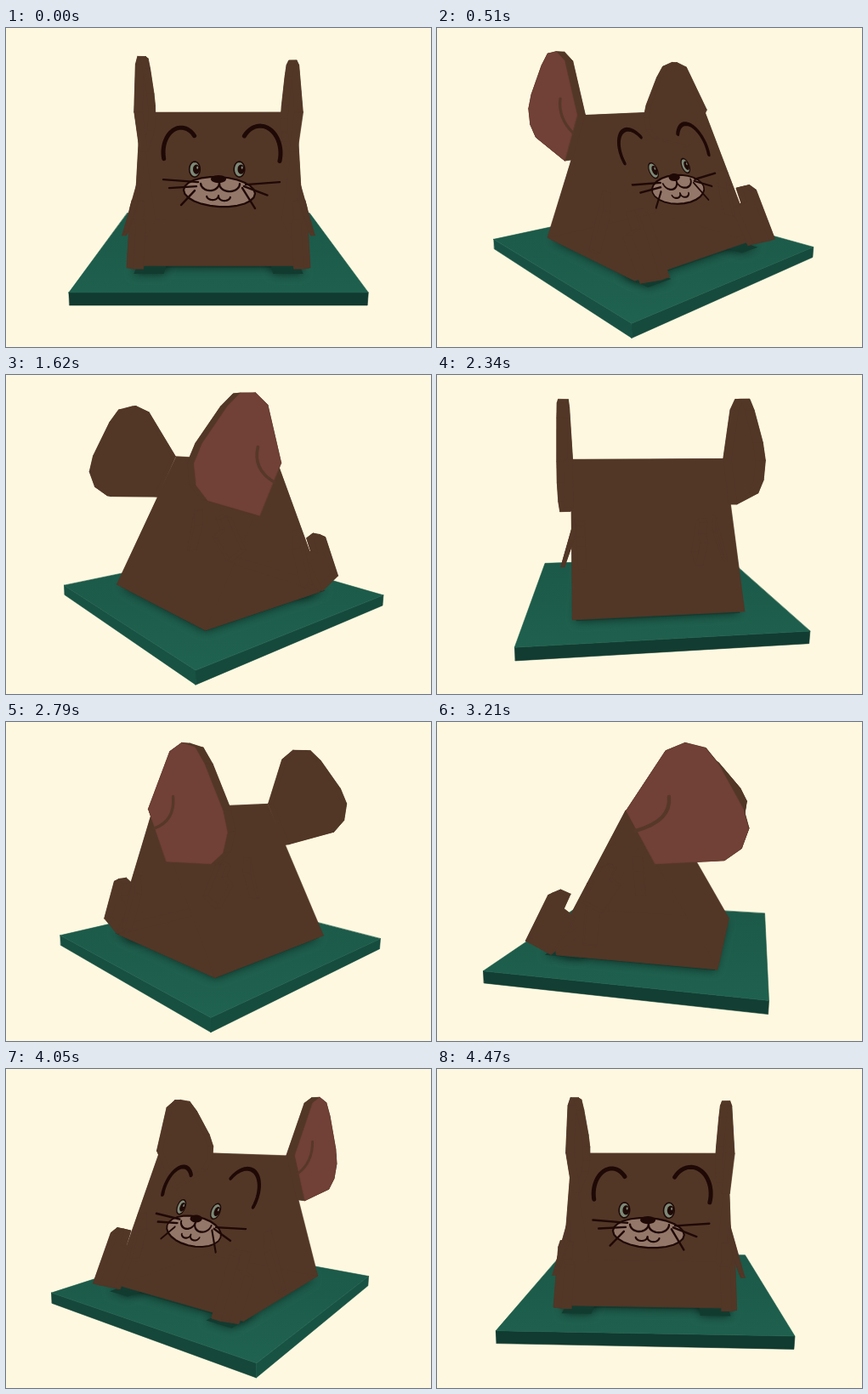
An HTML page with a canvas for the animation above (4500 ms loop, 500x375 px).

```html
<!DOCTYPE html>
<html lang="en">
<head>
<meta charset="utf-8">
<title>Turntable</title>
<style>
html, body { margin: 0; width: 100%; height: 100%; overflow: hidden; background: #fff8e0; }
canvas { display: block; width: 500px; height: 375px; }
</style>
</head>
<body>
<canvas id="stage" width="500" height="375"></canvas>
<script>
const ctx = document.getElementById('stage').getContext('2d');
const STEP = 30, STEPS = 150, CAM = 4.1, RAD = Math.PI / 180;
const BROWN = '#523727', PINK = '#714037', INK = '#1f0906', CURL = '#563829', EYE = '#7d8a78';
let sin = 0, cos = 1;

const range = n => [...Array(n).keys()];

// Model space: x right, y up from the slab, z towards the face.
function project([x, y, z]) {
  const vx = cos * x + sin * z, vz = cos * z - sin * x;
  const k = 1 / (0.0075 - 0.00183 * vz - 0.000393 * y);
  return [250 + k * vx, 187.5 + k * (0.484 + 0.21 * vz - 0.978 * y)];
}

function trace(points) {
  ctx.beginPath();
  points.forEach(p => ctx.lineTo(...project(p)));
  ctx.closePath();
}

function fill(points, color) {
  trace(points);
  ctx.fillStyle = ctx.strokeStyle = color;
  ctx.lineWidth = 0.6;
  ctx.fill();
  ctx.stroke();
}

// Solid between two matching outlines; one flat colour needs no sorting.
function solid(a, b) {
  fill(a, BROWN);
  fill(b, BROWN);
  a.forEach((p, i) => {
    const j = (i + 1) % a.length;
    fill([p, a[j], b[j], b[i]], BROWN);
  });
}

const atX = (profile, x) => profile.map(([z, y]) => [x, y, z]);
const atZ = (profile, side, z) => profile.map(([x, y]) => [side * x, y, z]);

const BODY = [[0.02, 1.132], [0.6, 0.1], [0.59, 0.02], [-0.65, 0.02]];
const PAW = [[0.64, 0.015], [0.85, 0.11], [0.64, 0.49], [0.57, 0.52], [0.49, 0.49], [0.55, 0.37], [0.45, 0.3]];
const FLAP = [[0.64, 0.6], [0.775, 0.17], [0.745, 0.17], [0.64, 0.45]];

// An ear is two rounded corners swung around a hinge on the back slope.
const EARS = [{ side: 1, tilt: 11, reach: 0.505 }, { side: -1, tilt: 0, reach: 0.48 }];
const EAR_IN = 0.63, EAR_OUT = 0.7, CORNER = 0.225;

const polar = ([u, y], r, deg) => [u + r * Math.cos(deg * RAD), y + r * Math.sin(deg * RAD)];
const hinge = [0.1, 0.95];

for (const ear of EARS) {
  const { tilt, reach } = ear;
  const corner = (at, from) => range(4).map(i =>
    polar(polar(hinge, reach, at - tilt), CORNER, from - 35 * i - tilt));
  ear.rim = [[0, 1.135], ...corner(63, 139), ...corner(20, 46), [0.205, 0.775]];
  ear.curl = [polar(hinge, 0.68 * reach, 66 - tilt), polar(hinge, 0.49 * reach, 40 - tilt), [0.065, 1]];
}
const earAt = (points, x) => points.map(([u, y]) => [x, y, -u]);

const square = (x0, x1, z0, z1, y) => [[x0, y, z1], [x1, y, z1], [x1, y, z0], [x0, y, z0]];

function slab() {
  const top = square(-1, 1, -1, 1, -0.006), low = square(-1, 1, -1, 1, -0.099);
  top.forEach((p, i) => {
    const j = (i + 1) % 4, a = project(p), b = project(top[j]);
    if (a[0] >= b[0]) return;
    const slope = Math.abs((b[1] - a[1]) / (b[0] - a[0]));
    const l = 17 + 7 * Math.min(1, slope * 1.6);
    fill([p, top[j], low[j], low[i]], `rgb(${l},${l * 3.4},${l * 2.8})`);
  });
  const shade = ctx.createLinearGradient(0, 205, 0, 340);
  shade.addColorStop(0, '#1b5747');
  shade.addColorStop(1, '#1f624f');
  fill(top, shade);

  ctx.save();
  trace(top);
  ctx.clip();
  ctx.shadowColor = 'rgba(4,24,18,.7)';
  ctx.shadowBlur = 11;
  ctx.fillStyle = '#123b30';
  const patches = [square(-0.62, 0.62, -0.63, 0.58, 0)];
  for (const x of [-0.62, 0.4]) patches.push(square(x, x + 0.22, 0.4, 0.7, 0));
  patches.forEach(p => { trace(p); ctx.fill(); });
  ctx.restore();
}

// The face is laid out in front-view pixels and mapped on the sloped front.
function onSlope(px, py) {
  const q = py - 187.5;
  const y = (0.623 - 0.006285 * q) / (1.098 + 0.00065 * q);
  return project([(px - 250) * (0.006285 + 0.00065 * y), y, 0.664 - 0.57 * y]);
}

// Strokes the current path with a pen foreshortened like the surface.
function ink(width) {
  const o = onSlope(250, 165), a = onSlope(260, 165), b = onSlope(250, 175);
  ctx.save();
  ctx.transform((a[0] - o[0]) / 10, (a[1] - o[1]) / 10, (b[0] - o[0]) / 10, (b[1] - o[1]) / 10, 0, 0);
  ctx.strokeStyle = INK;
  ctx.lineWidth = width;
  ctx.stroke();
  ctx.restore();
}

function arc(x, y, rx, ry, from, to, width, color, lean = 0) {
  ctx.beginPath();
  for (const i of range(25)) {
    const a = (from + (to - from) * i / 24) * RAD, dx = rx * Math.cos(a);
    ctx.lineTo(...onSlope(x + dx, y + ry * Math.sin(a) + lean * dx));
  }
  if (color) {
    ctx.fillStyle = color;
    ctx.fill();
  }
  if (width) ink(width);
}
const oval = (x, y, rx, ry, color, width, lean) => arc(x, y, rx, ry, 0, 360, width, color, lean);

function line(x0, y0, x1, y1, width) {
  ctx.beginPath();
  ctx.moveTo(...onSlope(x0, y0));
  ctx.lineTo(...onSlope(x1, y1));
  ink(width);
}

function face() {
  const a = onSlope(200, 120), b = onSlope(300, 120), c = onSlope(200, 200);
  if ((b[0] - a[0]) * (c[1] - a[1]) <= (b[1] - a[1]) * (c[0] - a[0])) return;
  ctx.lineCap = ctx.lineJoin = 'round';
  arc(206, 146, 21, 29, 165, 318, 5);
  arc(299, 147, 24, 32, 219, 377, 5);
  for (const x of [222, 274.5]) {
    oval(x, 166, 6.3, 9, EYE, 1.6);
    oval(x + 2, 166, 4, 5.6, INK);
    oval(x + 3.2, 164, 1, 1.6, EYE);
  }
  oval(251, 192.5, 42, 17.5, '#937769', 2.2, 0.05);
  arc(240, 182, 11, 9, 0, 175, 2.4);
  arc(263, 183, 12, 9, 0, 180, 2.4);
  arc(243, 197, 7, 5, 0, 170, 2.2);
  arc(257, 198, 7, 5, 10, 180, 2.2);
  for (const i of range(3)) {
    line(226 - 2 * i, 181 + 5 * i, 185 + 3.5 * (i + i * i), 178 + 5 * (i + i * i), 2.4);
    line(282 - 2 * i, 184 + 2 * i, 322 - 14.5 * i, 181 + 15.5 * i, 2.4);
  }
  oval(250, 177.5, 9, 4.6, INK);
}

function draw(angle) {
  sin = Math.sin(angle);
  cos = Math.cos(angle);
  ctx.fillStyle = '#fff8e0';
  ctx.fillRect(0, 0, 500, 375);
  slab();
  solid(atX(BODY, -0.645), atX(BODY, 0.645));
  for (const { side, rim } of EARS) {
    solid(atX(PAW, side * 0.56), atX(PAW, side * 0.637));
    solid(atZ(FLAP, side, 0.22), atZ(FLAP, side, 0.32));
    solid(earAt(rim, side * EAR_IN), earAt(rim, side * EAR_OUT));
  }
  face();
  for (const { side, rim, curl } of EARS) {
    if (-side * sin * CAM < EAR_OUT) continue;
    fill(earAt(rim, side * EAR_OUT), PINK);
    const [a, b, c] = earAt(curl, side * EAR_OUT).map(project);
    ctx.beginPath();
    ctx.moveTo(...a);
    ctx.quadraticCurveTo(...b, ...c);
    ctx.strokeStyle = CURL;
    ctx.lineWidth = 1 + 3.4 * Math.abs(sin);
    ctx.lineCap = 'round';
    ctx.stroke();
  }
}

const start = performance.now();
function tick(now) {
  const step = Math.floor(Math.max(0, now - start) / STEP) % STEPS;
  draw(step / STEPS * Math.PI * 2);
  requestAnimationFrame(tick);
}
draw(0);
requestAnimationFrame(tick);
</script>
</body>
</html>
```
